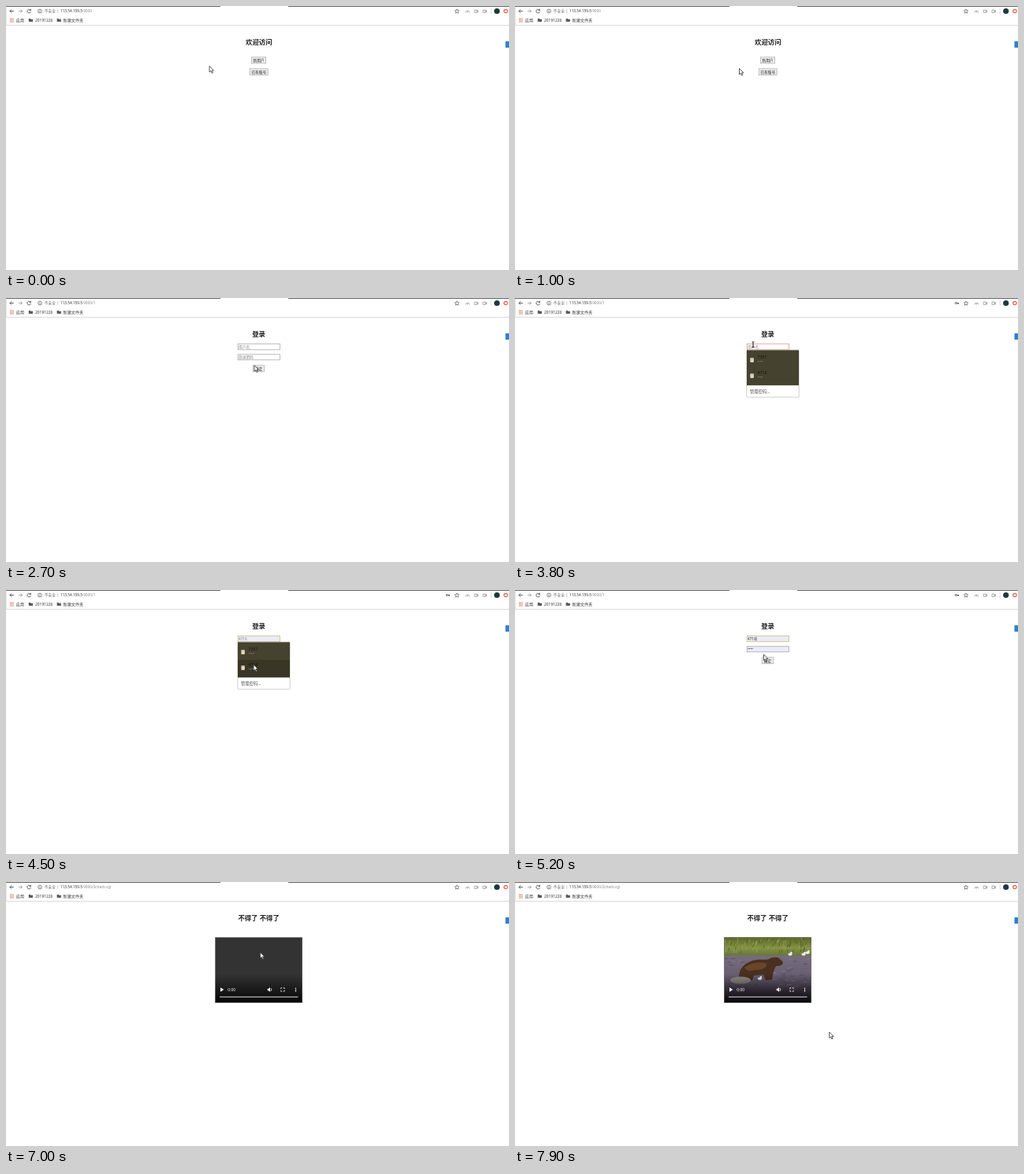
An HTML page that plays this animation: 638 px wide and 336 px high, repeating every 8 s.

```html
<!DOCTYPE html>
<html lang="zh-CN">
<head>
<meta charset="utf-8">
<style>
html, body { margin: 0; width: 100%; height: 100%; overflow: hidden; background: #fff; }
svg { display: block; width: 638px; height: 336px; }
text { font: 4.7px "Noto Sans", "Noto Sans CJK SC", "Noto Sans CJK", sans-serif; fill: #333; white-space: pre; }
.title { font-size: 8.4px; font-weight: 700; fill: #222; text-anchor: middle; }
.mid { text-anchor: middle; fill: #222; }
.dim { fill: #888; }
.line { fill: none; stroke: #555; stroke-width: .9; }
.soft { fill: none; stroke: #999; stroke-width: .8; }
.button { fill: #ececec; stroke: #aaa; stroke-width: .7; }
.button.down { fill: #d2d2d2; stroke: #777; }
.field { fill: #fff; stroke: #aaa; stroke-width: .8; }
.field.filled { fill: #ecebfa; }
.field.focus { stroke: #c9bd83; }
.field.open { fill: #fff; stroke: #e39a88; }
</style>
</head>
<body>
<svg viewBox="0 0 638 336">
  <defs>
    <linearGradient id="grass" x2="0" y2="1">
      <stop stop-color="#566529"/><stop offset=".55" stop-color="#849343"/><stop offset="1" stop-color="#66703a"/>
    </linearGradient>
    <linearGradient id="river" x2="0" y2="1">
      <stop stop-color="#756d7b"/><stop offset=".5" stop-color="#655b70"/><stop offset="1" stop-color="#50465a"/>
    </linearGradient>
    <linearGradient id="shade" x2="0" y2="1">
      <stop stop-color="#000" stop-opacity="0"/><stop offset=".6" stop-color="#000" stop-opacity=".55"/><stop offset="1" stop-color="#000" stop-opacity=".9"/>
    </linearGradient>
    <path id="folder" d="M0 0h2l.7.8H5.2V4.2H0z" fill="#5b5b5b"/>
    <g id="lock"><rect width="4.4" height="5.6" rx=".7" fill="#efe9cf"/><path d="M1 1.4h2.4M1.2 3.2h1.6" stroke="#a39a6c" stroke-width=".8"/></g>
    <g id="gull" fill="#eeeef0"><ellipse rx="2.7" ry="1.7"/><circle cx="1.4" cy="-2" r="1.2"/></g>
  </defs>

  <!-- browser bar -->
  <path d="M0 .5H272M358 .5H638" stroke="#666"/>
  <path d="M0 24.5H638" stroke="#dcdcdc"/>
  <path d="M.3 1V24" stroke="#ccc" stroke-width=".6"/>
  <path class="line" d="M9.8 6.5H5M7.2 4.2 4.9 6.5 7.2 8.8"/>
  <path class="soft" d="M15.8 6.5H20.6M18.4 4.2 20.7 6.5 18.4 8.8"/>
  <path id="reload" class="line" d="M31 5.2A2.3 2.3 0 1 0 31.4 7.2M31.5 3.8V5.7H29.5"/>
  <path id="stop" class="line" d="M27 4.3 31.4 8.7M31.4 4.3 27 8.7"/>
  <circle class="line" cx="43" cy="6.5" r="2.4" style="stroke-width:.7"/>
  <path d="M43 6.2V8M43 4.9V5.5" stroke="#555" stroke-width=".7"/>
  <text x="48.8" y="8.3" style="fill:#666">不安全</text>
  <path d="M65.7 4V9" stroke="#aaa" stroke-width=".6"/>
  <text x="69" y="8.3">113.54.159.5<tspan class="dim" id="path"></tspan></text>
  <g id="key" fill="none" stroke="#555"><circle cx="559.3" cy="6.5" r="1"/><path d="M560.4 6.5H563M562.3 6.5V8"/></g>
  <path class="line" style="stroke-width:.7" d="M572 3.9l.8 1.8 1.9.2-1.4 1.3.4 1.9-1.7-1-1.7 1 .4-1.9-1.4-1.3 1.9-.2z"/>
  <path class="soft" d="M583 8.5A2.4 2.4 0 1 1 587.8 8.5M585.4 8.5V6.3M594.2 5h3v3.4h-3zM597.2 6.2l1.5-.8v2.6l-1.5-.8M605 5h3v3.4h-3zM608 6.2l1.5-.8v2.6l-1.5-.8"/>
  <path d="M615.3 3V10" stroke="#ccc" stroke-width=".6"/>
  <circle cx="622.7" cy="6.5" r="3.6" fill="#20383c"/>
  <circle cx="633.9" cy="6.5" r="2.2" fill="none" stroke="#e2604a" stroke-width="1.2"/>
  <path d="M5 16.2H9.8M5 18.2H9.8M5 20.2H9.8" stroke="#df7a63" stroke-width="1.2" stroke-dasharray="1.2 .6"/>
  <text x="12.8" y="19.9" style="font-size:5.1px">应用</text>
  <use href="#folder" x="28.8" y="15.9"/>
  <text x="37" y="19.8" style="font-size:4.9px">20191226</text>
  <use href="#folder" x="64.6" y="15.9"/>
  <text x="72.6" y="19.9" style="font-size:5.1px">新建文件夹</text>
  <rect x="633.5" y="45" width="4.5" height="8" fill="#2f7fd0"/>

  <g id="welcome">
    <text class="title" x="320.8" y="49.3">欢迎访问</text>
    <rect class="button" x="311.3" y="65" width="18.4" height="8"/>
    <text class="mid" x="320.5" y="70.8">新用户</text>
    <rect class="button" id="account" x="309.2" y="79.8" width="23" height="8.2"/>
    <text class="mid" x="320.7" y="85.7">已有账号</text>
  </g>

  <g id="login">
    <text class="title" x="320.6" y="49.3">登录</text>
    <rect class="field" id="user" x="294.2" y="58.3" width="53.3" height="7.5"/>
    <text id="userText" x="295" y="63.7"></text>
    <path id="caret" d="M306 59.6V64.6" stroke="#333" stroke-width=".6"/>
    <rect class="field" id="pass" x="294.2" y="71.8" width="53.3" height="7"/>
    <text id="passText" x="295" y="77"></text>
    <rect class="button" id="ok" x="313.2" y="85.8" width="14.6" height="8"/>
    <text class="mid" x="320.5" y="91.6">确定</text>
    <g id="menu">
      <rect x="293.8" y="66.2" width="66.4" height="60" rx="1" fill="#fff" stroke="#bbb" stroke-width=".7"/>
      <rect x="294" y="66.4" width="66" height="44.8" fill="#45422f"/>
      <rect id="hover" x="294" y="89" width="66" height="22.2" fill="#393625"/>
      <use href="#lock" x="298.4" y="76.2"/>
      <text x="307.5" y="77" style="font-size:5.3px;fill:#17160f">7351</text>
      <text x="307.5" y="83" style="fill:#8b886f">••••</text>
      <use href="#lock" x="298.4" y="96.2"/>
      <text x="307.5" y="97" style="font-size:5.3px;fill:#17160f">4716</text>
      <text x="307.5" y="103" style="fill:#8b886f">••••</text>
      <text x="298" y="120.8" style="font-size:5.3px;fill:#555">管理密码...</text>
    </g>
  </g>

  <g id="result">
    <text class="title" x="320.6" y="49.3">不得了 不得了</text>
    <svg id="video" x="265.3" y="70.5" width="110.6" height="83" viewBox="265.3 70.5 110.6 83">
      <rect x="265" y="70" width="112" height="84" fill="#333"/>
      <g id="scene">
        <rect x="265" y="70" width="112" height="25" fill="url(#grass)"/>
        <rect x="265" y="93.5" width="112" height="60" fill="url(#river)"/>
        <g id="blades" stroke-width=".7" fill="none"></g>
        <path d="M284 125C283 113 288 105 299 101 308 97 317 100 322 98 327 95 334 95 336 98L340 102C340 106 336 107 331 107 328 112 327 117 326 124L318 125 315 118 303 119 301 125Z" fill="#49301f"/>
        <path d="M291 109C300 102 310 102 318 103 322 108 314 112 306 112 299 113 295 115 291 109Z" fill="#6a4528"/>
        <ellipse cx="286" cy="125" rx="13" ry="4.5" fill="#928b83"/>
        <use href="#gull" x="349" y="92"/><use href="#gull" x="366" y="92"/>
        <use href="#gull" x="371" y="90"/><use href="#gull" x="310.5" y="123"/>
      </g>
      <rect x="265" y="117" width="112" height="37" fill="url(#shade)"/>
      <path d="M272 134.3V139.7L276.3 137zM331.8 135.8h1.5l1.7-1.7v5.8l-1.7-1.7h-1.5z" fill="#fff"/>
      <path d="M336 135.2A2.5 2.5 0 0 1 336 138.8M348.8 136.2V134.8H350.2M351.8 134.8H353.2V136.2M353.2 137.8V139.2H351.8M350.2 139.2H348.8V137.8" fill="none" stroke="#fff" stroke-width=".8"/>
      <path d="M367.5 134.8V139.8" stroke="#fff" stroke-width="1.2" stroke-dasharray="1.2 .7"/>
      <text x="281.3" y="138.8" style="font-size:5px;fill:#fff">0:00</text>
      <path d="M271 146.2H370.5" stroke="#ddd" stroke-width="1.1"/>
    </svg>
    <rect x="265.6" y="70.8" width="110" height="82.5" fill="none" stroke="#777" stroke-width=".5"/>
  </g>

  <path id="arrow" d="M0 0V7.6L1.8 6 3.1 8.9 4.4 8.3 3.1 5.5H5.4Z" fill="#fff" stroke="#333" stroke-width=".8"/>
  <path id="beam" d="M-1.5-3.3H1.5M-1.5 3.3H1.5M0-3.3V3.3" stroke="#333" stroke-width="1.1"/>
</svg>
<script>
const $ = id => document.getElementById(id);
const show = (id, on) => $(id).style.display = on ? '' : 'none';
const toggle = (id, name, on) => $(id).classList.toggle(name, on);

// Pointer position: time, x, y
const track = [
  [0, 258, 76.5], [600, 258, 76.5], [1000, 284.5, 79.5], [1500, 301, 85], [1900, 315, 85.7],
  [2900, 315, 85.7], [3200, 302, 59.3], [4000, 302, 59.3], [4500, 314, 95], [5000, 314, 95],
  [5200, 315.5, 82], [5300, 316, 80], [5400, 316, 80], [5600, 334, 78], [5900, 322.4, 89.5],
  [7400, 322.4, 89.5], [7700, 430, 175], [7900, 398.7, 191], [8000, 398.7, 191]
];

function pointer(t) {
  const i = track.findIndex(p => p[0] > t);
  const [a, b] = [track[i - 1], track[i]];
  const k = (t - a[0]) / (b[0] - a[0]);
  return [a[1] + (b[1] - a[1]) * k, a[2] + (b[2] - a[2]) * k];
}

// Grass blades and ripples
let seed = 7;
const rand = () => (seed = seed * 16807 % 2147483647) / 2147483647;
let marks = '';
for (let i = 0; i < 150; i++) {
  const x = 265 + rand() * 110, grass = i < 80, y = grass ? 73 + rand() * 19 : 97 + rand() * 38;
  const color = grass ? ['#49591f', '#9aa64f'][i % 2] : ['#857c8c', '#51485c'][i % 2];
  marks += `<path d="M${x} ${y}${grass ? 'l1 -4' : 'h5'}" stroke="${color}"/>`;
}
$('blades').innerHTML = marks;

function draw(now) {
  const t = Math.floor(now % 8000 / 100) * 100;
  const within = (a, b) => t >= a && t < b;
  const filled = t >= 5100, open = within(3800, 5100), preview = within(4300, 5100);

  show('welcome', t < 2700);
  show('login', within(2700, 6800));
  show('result', t >= 6800);
  const loading = within(2500, 2700) || within(6600, 7000);
  show('stop', loading);
  show('reload', !loading);
  show('key', within(3200, 6800));
  $('path').textContent = ':9000' + (t < 2500 ? '' : t < 6600 ? '/1' : '/2check.cgi');

  toggle('account', 'down', within(2300, 2500));
  toggle('ok', 'down', within(6400, 6600));
  toggle('user', 'open', open && !preview);
  toggle('user', 'focus', preview || within(5100, 6400));
  for (const id of ['user', 'pass']) {
    toggle(id, 'filled', filled || preview);
    toggle(id + 'Text', 'dim', !filled);
  }
  $('userText').textContent = filled || preview ? '4716' : '用户名';
  $('passText').textContent = filled || preview ? '••••' : '登录密码';
  show('caret', within(5100, 6400));
  show('menu', open);
  show('hover', preview);
  show('video', t >= 6900);
  show('scene', t >= 7100);

  const beam = within(3200, 4100);
  show('beam', beam);
  show('arrow', !beam);
  $(beam ? 'beam' : 'arrow').setAttribute('transform', `translate(${pointer(t)})`);
}

const start = performance.now();
function tick() {
  draw(performance.now() - start);
  requestAnimationFrame(tick);
}
tick();
</script>
</body>
</html>
```
